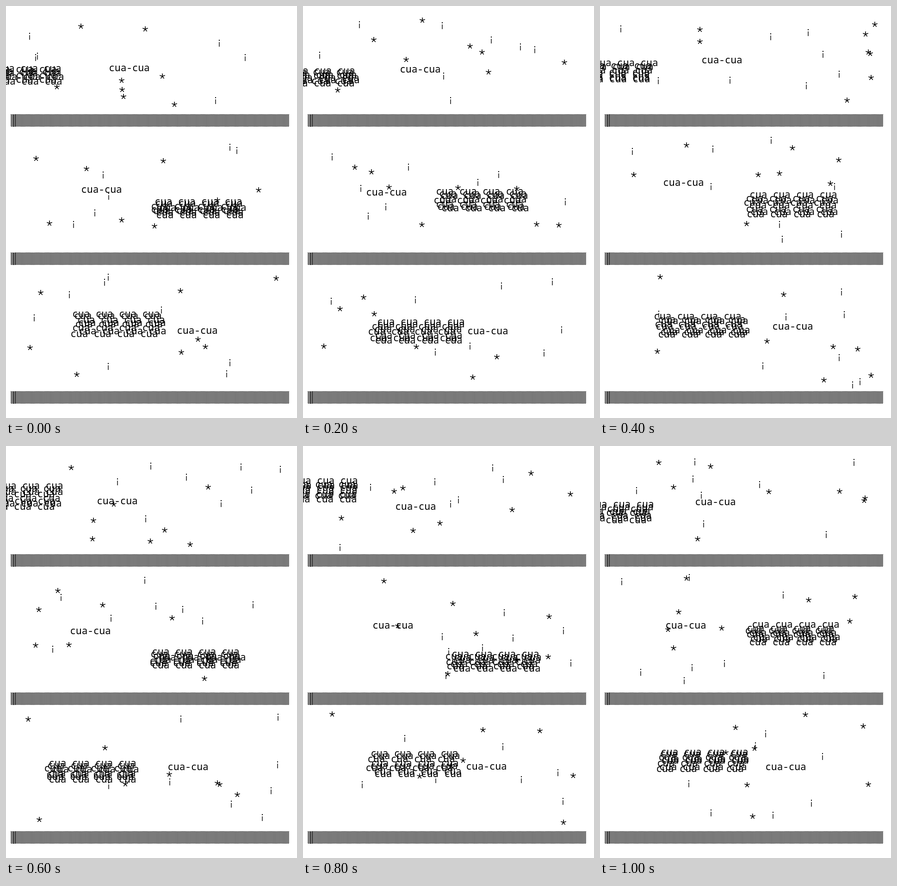
An HTML page for the animation above (1200 ms loop, 629 px wide and 891 px high).

```html
<!DOCTYPE html>
<html lang="en">
<head>
<meta charset="utf-8">
<title>cua-cua</title>
<style>
  html, body { margin: 0; width: 100%; height: 100%; overflow: hidden; background: #fff; }
  svg { display: block; width: 100%; height: 100%; }
  text { font: 21px "Noto Sans Mono", "Liberation Mono", monospace; white-space: pre; }
  .star { fill: none; stroke: #000; stroke-width: 1.6; }
</style>
</head>
<body>
<svg viewBox="0 0 629 891" xmlns="http://www.w3.org/2000/svg">
  <defs>
    <pattern id="shade" width="3.15" height="3" patternUnits="userSpaceOnUse">
      <path d="M0 0h1.7v1.6H0zM1.575 1.5h1.7v1.6h-1.7z"/>
    </pattern>
    <path id="star" class="star" d="M0 0V-6M0 0L5.7-1.9M0 0L3.6 4.9M0 0L-3.6 4.9M0 0L-5.7-1.9"/>
    <path id="bang" d="M-1-8h2v2.2h-2zM-.7-3H.7V7H-.7z"/>
    <g id="bar">
      <rect x="10" width="602" height="27" fill="url(#shade)"/>
      <path d="M16 0h1v27h-1zM20 0h1v27h-1z"/>
    </g>
  </defs>
  <rect width="629" height="891" fill="#fff"/>
  <use href="#bar" y="234"/>
  <use href="#bar" y="533"/>
  <use href="#bar" y="833"/>
  <g id="scene"></g>
</svg>
<script>
const STEP = 200, STEPS = 6;
const MARKS = 8, ROWS = 8, SWAY = 20;
const BASELINE = 6.5; // from the middle of a lowercase letter

// call: left, middle for each step; flock: left, first row, last row for each step
const panels = [
  {
    top: 29, height: 191,
    call: [[224, 134], [211, 137], [221, 117], [198, 119], [201, 131], [207, 121]],
    flock: [[-81, 135, 163], [-82, 140, 167], [-81, 123, 158], [-83, 86, 131], [-82, 75, 115], [-88, 126, 160]]
  },
  {
    top: 284, height: 225,
    call: [[164, 397], [138, 403], [138, 382], [140, 400], [152, 388], [143, 388]],
    flock: [[313, 423, 452], [282, 401, 437], [311, 408, 450], [311, 445, 474], [309, 450, 481], [313, 386, 424]]
  },
  {
    top: 580, height: 240,
    call: [[371, 702], [357, 703], [374, 693], [351, 694], [354, 693], [359, 694]],
    flock: [[140, 666, 709], [142, 683, 723], [117, 671, 710], [82, 686, 721], [137, 665, 709], [119, 662, 698]]
  }
];

function seeded(seed) {
  let s = seed;
  return () => {
    s = (s + 0x6d2b79f5) | 0;
    let n = Math.imul(s ^ (s >>> 15), s | 1);
    n ^= n + Math.imul(n ^ (n >>> 7), n | 61);
    return ((n ^ (n >>> 14)) >>> 0) / 4294967296;
  };
}

const word = (x, y, s) => `<text x="${x - 1.5}" y="${y + BASELINE}">${s}</text>`;
const mark = (id, x, y) => `<use href="#${id}" x="${Math.round(x)}" y="${Math.round(y)}"/>`;

function scatter(id, panel, rand) {
  let out = "";
  for (let i = 0; i < MARKS; i++) {
    out += mark(id, 34 + rand() * 562, panel.top + rand() * panel.height);
  }
  return out;
}

function flock([left, first, last], rand) {
  let out = "";
  for (let i = 0; i < ROWS; i++) {
    const edge = i === 0 || i === ROWS - 1;
    const shift = edge ? 0 : (rand() - 0.5) * 0.9;
    const y = first + (last - first) * (i + shift) / (ROWS - 1);
    out += word(Math.round(left + rand() * SWAY), Math.round(y), "cua cua cua cua");
  }
  return out;
}

function drawPanel(panel, index, step) {
  const rand = seeded(101 + index * 977 + step * 7919);
  const [x, y] = panel.call[step];
  return scatter("star", panel, rand) + scatter("bang", panel, rand) +
    flock(panel.flock[step], rand) + word(x, y, "cua-cua");
}

const scene = document.getElementById("scene");
const start = performance.now();
let shown = -1;

function draw(time) {
  const step = Math.floor(time / STEP) % STEPS;
  if (step === shown) return;
  shown = step;
  scene.innerHTML = panels.map((p, i) => drawPanel(p, i, step)).join("");
}

function tick() {
  draw(performance.now() - start);
  requestAnimationFrame(tick);
}
tick();
</script>
</body>
</html>
```
